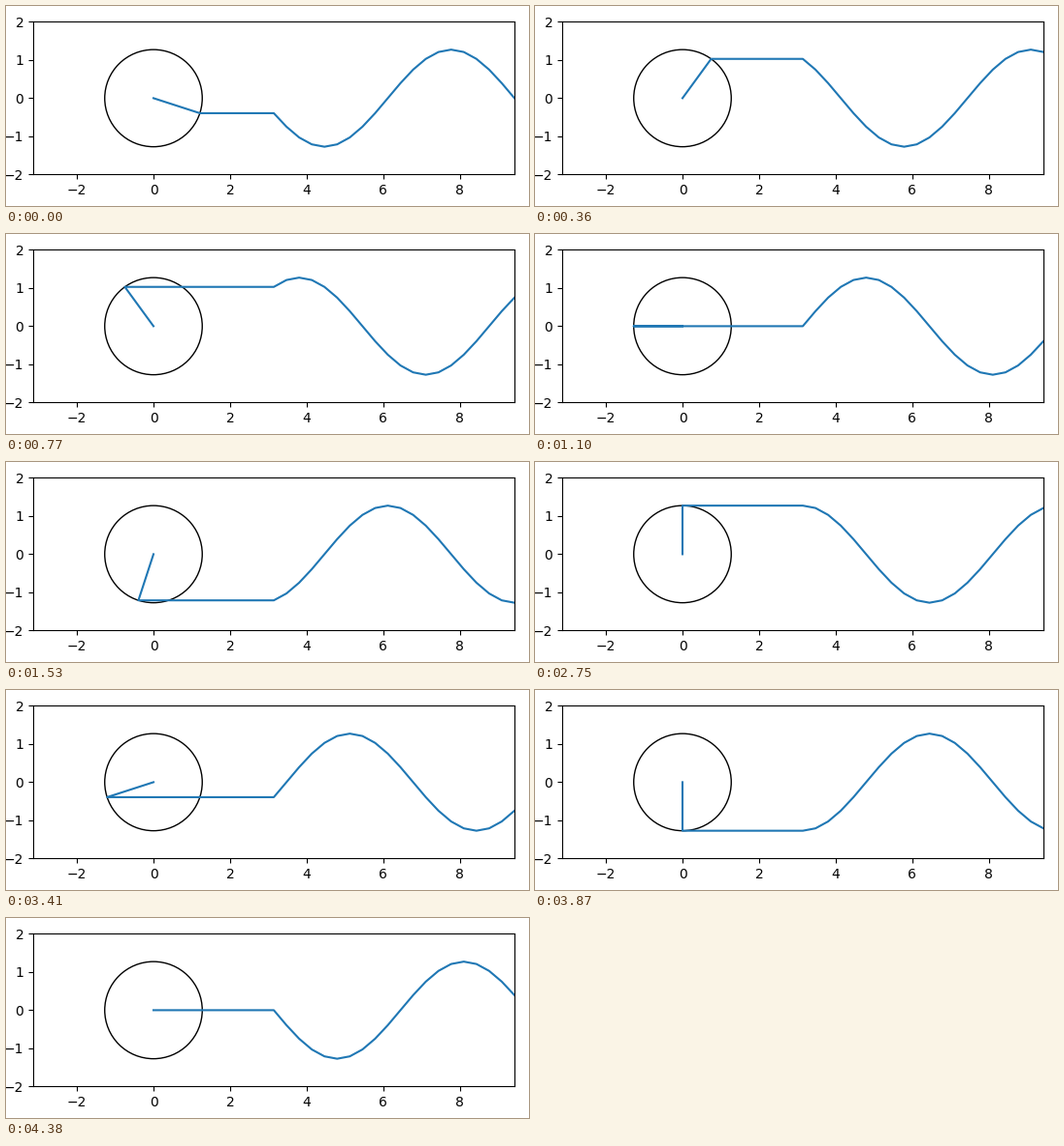
These frames come from a looping animation (539 px wide and 207 px high, 4430 ms). A matplotlib script:

```python
import numpy as np
import matplotlib.pyplot as plt
from matplotlib.animation import FuncAnimation

W, H, DPI = 539, 207, 100
LOOP, TICK = 4430, 10           # ms
STEP = np.pi / 10               # turn of the radius per change
R = 4 / np.pi
AX_LEFT, AX_WIDTH, AX_MID = 28, 496, 111.6
AX_HEIGHT = AX_WIDTH / np.pi

# uneven pauses between turns, in ms
PAUSES = [30, 90, 140, 100, 90, 90, 140, 90, 150, 90, 90, 150, 90, 100,
          90, 140, 140, 90, 100, 140, 90, 100, 90, 100, 140, 90, 140, 90,
          100, 140, 90, 100, 140, 90, 90, 140, 90, 100, 90, 140, 90]
turns = np.cumsum(PAUSES)

fig = plt.figure(figsize=((W + 1e-6) / DPI, (H + 1e-6) / DPI), dpi=DPI)
ax = fig.add_axes([AX_LEFT / W, (AX_MID - AX_HEIGHT / 2) / H,
                   AX_WIDTH / W, AX_HEIGHT / H])
ax.set(xlim=(-np.pi, 3 * np.pi), ylim=(-2, 2),
       xticks=range(-2, 9, 2), yticks=range(-2, 3))
ax.add_patch(plt.Circle((0, 0), R, fill=False))
line, = ax.plot([], [], lw=1.5, color="#1f77b4")

lag = np.arange(20)
wave_x = np.linspace(np.pi, 3 * np.pi, len(lag))


def update(i):
    n = np.searchsorted(turns, i * TICK, side="right")
    angle = (n - 1) * STEP
    x = np.r_[0, R * np.cos(angle), wave_x]
    y = np.r_[0, R * np.sin(angle), R * np.sin(angle - lag * STEP)]
    line.set_data(x, y)
    return line,


anim = FuncAnimation(fig, update, frames=LOOP // TICK, interval=TICK,
                     init_func=lambda: update(0), repeat=True,
                     repeat_delay=0)
plt.show()
```
